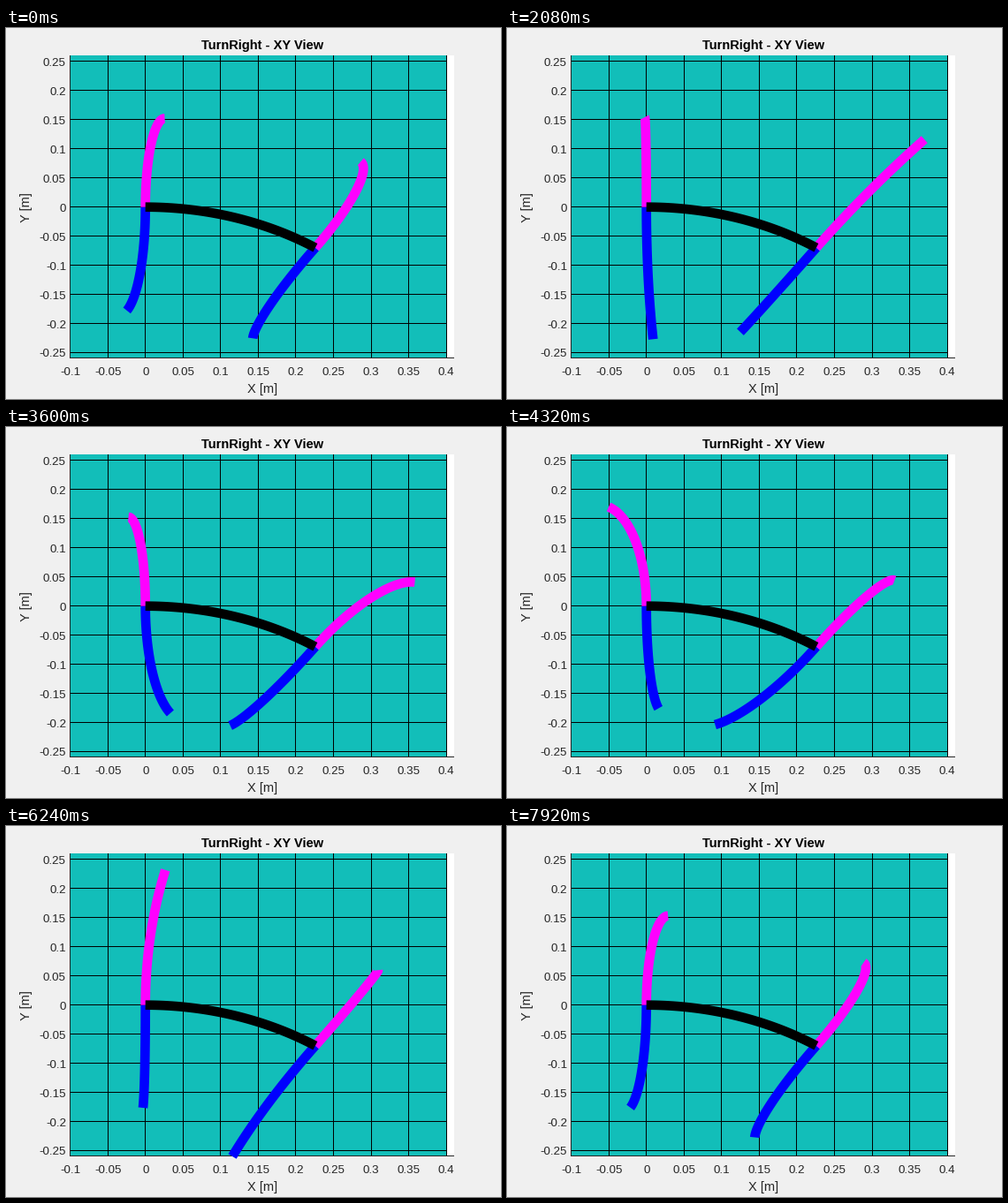
A matplotlib script that plays this animation: 560x420 px, repeating every 8 s.

```python
import numpy as np
import matplotlib.pyplot as plt
from matplotlib.animation import FuncAnimation
from matplotlib.patches import Rectangle

W, H, DPI = 560, 420, 100
PT = 72 / DPI                      # points per pixel
FRAMES, INTERVAL = 100, 80

X0, Y0, SX, SY = 157.7, 202.7, 851, 659
LEFT, RIGHT, EDGE = 73, 498, 507
TOP, BOTTOM = 31, 374

LENGTH = 0.24                      # every segment, in metres
BODY_BEND = 0.6
LIFT, LAND = 48.5, 99.5            # swing part of the gait cycle
INK = "#262626"

# Bend ellipse: half width, half height, centre, half width of the stance chord
FRONT = (0.56, 0.65, 0.985, 0.27)
BACK = (0.375, 0.405, 0.966, 0.19)

s = np.linspace(0, 1, 41)


def to_px(x, y):
    return X0 + SX * np.asarray(x), Y0 - SY * np.asarray(y)


def bend(phase, gait):
    """Sideways and downward bend of a leg: chord in stance, ellipse in swing."""
    a, b, centre, chord = gait
    end = np.pi - np.arcsin(chord / a)
    k = (phase - LAND) % FRAMES
    stance = LIFT + FRAMES - LAND
    if k < stance:
        return chord * (1 - 2 * k / stance), centre - b * np.cos(end)
    angle = end * (2 * (k - stance) / (FRAMES - stance) - 1)
    return a * np.sin(angle), centre - b * np.cos(angle)


def cut_bottom(x, y):
    """End the line where it leaves the plot box."""
    out = np.flatnonzero(y > BOTTOM)
    if not len(out):
        return x, y
    i = out[0]
    f = (BOTTOM - y[i - 1]) / (y[i] - y[i - 1])
    return (np.append(x[:i], x[i - 1] + f * (x[i] - x[i - 1])),
            np.append(y[:i], BOTTOM))


def leg_curve(phase, gait, base, heading, side):
    bx, bz = bend(phase, gait)
    theta = np.hypot(bx, bz)
    u = side * LENGTH * np.sin(theta * s) / theta
    v = LENGTH * bx * (1 - np.cos(theta * s)) / theta ** 2
    c, d = np.cos(heading), np.sin(heading)
    return cut_bottom(*to_px(base[0] + u * d + v * c,
                             base[1] + u * c - v * d))


fig = plt.figure(figsize=(W / DPI, H / DPI), dpi=DPI, facecolor="#f0f0f0")
ax = fig.add_axes([0, 0, 1, 1])
ax.set(xlim=(0, W), ylim=(H, 0))
ax.axis("off")


def box(x, y, w, h, color, z):
    ax.add_patch(Rectangle((x, y), w, h, fc=color, ec="none", zorder=z,
                           antialiased=False))


def label(x, y, text, size, **kw):
    opts = dict(color=INK, ha="center", va="baseline", family="Liberation Sans")
    opts.update(kw)
    ax.text(x, y, text, fontsize=size * PT, **opts)


def limb(color, z):
    return ax.plot([], [], color=color, lw=10.67 * PT, solid_capstyle="butt",
                   solid_joinstyle="round", clip_on=False, zorder=z)[0]


box(LEFT, TOP, EDGE - LEFT, BOTTOM - TOP, "white", 0)
box(LEFT, TOP, RIGHT - LEFT, BOTTOM - TOP, "#12beb9", 1)

for i in range(11):
    value = round(-0.1 + 0.05 * i, 2)
    px = to_px(value, 0)[0]
    box(np.floor(px), TOP, 1, BOTTOM - TOP, "black", 2)
    label(px, 393, f"{value:g}", 13.33)
for i in range(11):
    value = round(-0.25 + 0.05 * i, 2)
    py = to_px(0, value)[1]
    box(LEFT, np.floor(py), RIGHT - LEFT, 1, "black", 2)
    label(68, py + 5, f"{value:g}", 13.33, ha="right")
box(LEFT - 1, BOTTOM - 1, EDGE - LEFT + 1, 1, INK, 3)
box(LEFT - 1, TOP, 1, BOTTOM - TOP, INK, 3)

label(290, 24, "TurnRight - XY View", 14.67, color="black", weight="bold")
label(290, 413, "X [m]", 14.67)
label(29.5, 203, "Y [m]", 14.67, rotation=90, ha="right", va="center")

radius = LENGTH / BODY_BEND
body_x = radius * np.sin(BODY_BEND * s)
body_y = -radius * (1 - np.cos(BODY_BEND * s))
limb("black", 6).set_data(*to_px(body_x, body_y))

rear, front = (0, 0), (body_x[-1], body_y[-1])
legs = [
    (limb("magenta", 5), 0, FRONT, rear, 0, 1),
    (limb("blue", 4), 50, BACK, rear, 0, -1),
    (limb("magenta", 5), 50, FRONT, front, BODY_BEND, 1),
    (limb("blue", 4), 0, BACK, front, BODY_BEND, -1),
]


def update(i):
    for line, offset, gait, base, heading, side in legs:
        line.set_data(*leg_curve(i + offset, gait, base, heading, side))
    return [leg[0] for leg in legs]


anim = FuncAnimation(fig, update, frames=FRAMES, interval=INTERVAL,
                     init_func=lambda: update(0), repeat=True, repeat_delay=0)
plt.show()
```
